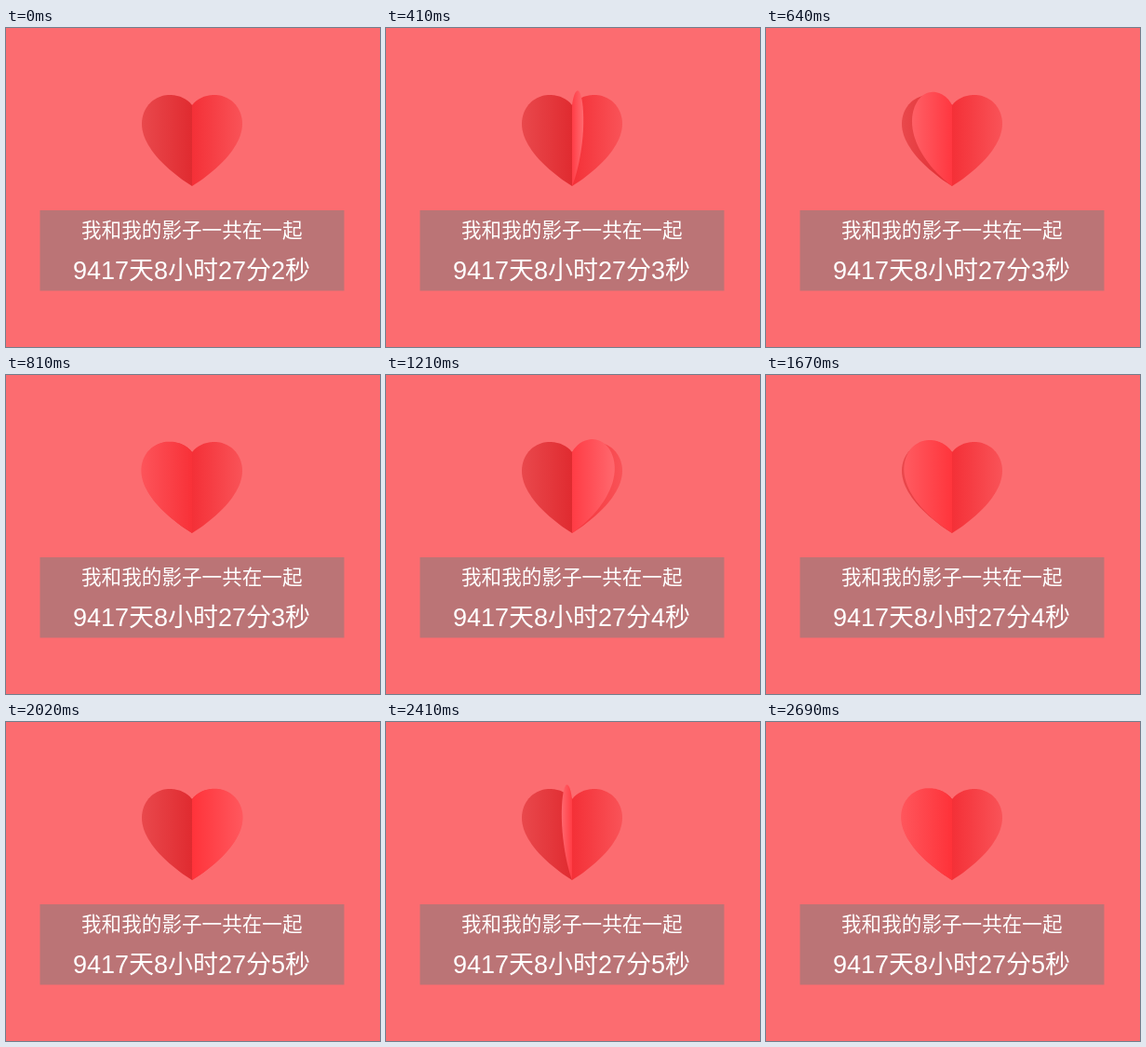
Recreate the animation shown at these times as an HTML page. Size 402x343 px, loop 2790 ms.

```html
<!DOCTYPE html>
<html lang="zh">
<head>
<meta charset="utf-8">
<title>纸心</title>
<style>
html, body { margin: 0; width: 100%; height: 100%; overflow: hidden; background: #fc6c70; }
svg { display: block; width: 402px; height: 343px; }
text {
  fill: #fff;
  text-anchor: middle;
  font-family: "Liberation Sans", "Noto Sans CJK SC", "Noto Sans CJK", sans-serif;
  font-weight: 300;
}
</style>
</head>
<body>
<svg viewBox="0 0 402 343">
  <defs>
    <linearGradient id="dark" gradientUnits="userSpaceOnUse" x1="200" x2="146" y1="0" y2="0">
      <stop offset="0" stop-color="#e02b30"/>
      <stop offset="1" stop-color="#e9484c"/>
    </linearGradient>
    <linearGradient id="bright" gradientUnits="userSpaceOnUse" x1="200" x2="254" y1="0" y2="0">
      <stop offset="0"/><stop offset="1"/>
    </linearGradient>
    <linearGradient id="lit" gradientUnits="userSpaceOnUse" x1="200" x2="254" y1="0" y2="0">
      <stop offset="0"/><stop offset="1"/>
    </linearGradient>
  </defs>
  <path id="left" fill="url(#dark)"/>
  <path id="right" fill="url(#bright)"/>
  <path id="flap" fill="url(#lit)"/>
  <rect x="36.5" y="196" width="327" height="86.5" fill="#bb7476"/>
  <text x="199.8" y="224.5" font-size="21.6">我和我的影子一共在一起</text>
  <text id="count" x="199.5" y="270" font-size="27"></text>
</svg>
<script>
const LOOP = 2790, STEP = 56.9, OFFSET = 12;
const FIRST = 80, PERIOD = 953, TURN = 750, HOLD = 780;
const AXIS = 200, EYE_Y = 120, DEPTH = 300, RADIUS = 54;
const PAPER = [[244, 48, 55], [249, 83, 88]];

// Half heart as cubic curves, measured from the fold.
const CURVES = [
  [[0, 83], [6, 75.5], [14.5, 72], [24, 72]],
  [[24, 72], [41, 72], [54, 85.5], [54, 103]],
  [[54, 103], [54, 129], [24, 155], [0, 170]]
];

const $ = id => document.getElementById(id);
const flap = $("flap"), count = $("count"), lit = $("lit");

function bezier([a, b, c, d], u) {
  const v = 1 - u;
  return [0, 1].map(i => v * v * v * a[i] + 3 * v * v * u * b[i] + 3 * v * u * u * c[i] + u * u * u * d[i]);
}

const outline = CURVES.flatMap(c => Array.from({ length: 25 }, (_, i) => bezier(c, i / 24)));

function project([x, y], angle, depth = DEPTH) {
  const k = 1 / (1 - x * Math.sin(angle) / depth);
  return [AXIS + x * Math.cos(angle) * k, EYE_Y + (y - EYE_Y) * k];
}

function halfPath(angle, depth) {
  return "M" + outline.map(p => project(p, angle, depth).map(n => n.toFixed(2)).join(" ")).join("L") + "Z";
}

function shade(gradient, light) {
  PAPER.forEach((rgb, i) => {
    const lighter = rgb.map(v => Math.min(255, Math.round(v * light)));
    gradient.children[i].setAttribute("stop-color", `rgb(${lighter})`);
  });
}

function drawFlap(turned) {
  const angle = Math.PI * turned;
  flap.setAttribute("d", halfPath(angle));
  lit.setAttribute("x2", project([RADIUS, EYE_Y], angle)[0]);
  shade(lit, 1 + 0.28 * Math.sin(Math.PI * turned ** 0.7));
}

function draw(time) {
  // The picture is redrawn in even steps.
  const t = Math.floor((time - OFFSET) / STEP) * STEP + OFFSET;
  const beat = Math.floor((t - FIRST) / PERIOD);
  const since = t - FIRST - beat * PERIOD;
  const moving = beat >= 0 && since < HOLD;
  count.textContent = `9417天8小时27分${3 + beat}秒`;
  flap.style.display = moving ? "" : "none";
  if (moving) drawFlap(Math.min(1, since / TURN));
}

$("left").setAttribute("d", halfPath(Math.PI, Infinity));
$("right").setAttribute("d", halfPath(0, Infinity));
shade($("bright"), 1);

const start = performance.now();
function tick() {
  draw((performance.now() - start) % LOOP);
  requestAnimationFrame(tick);
}
tick();
</script>
</body>
</html>
```
